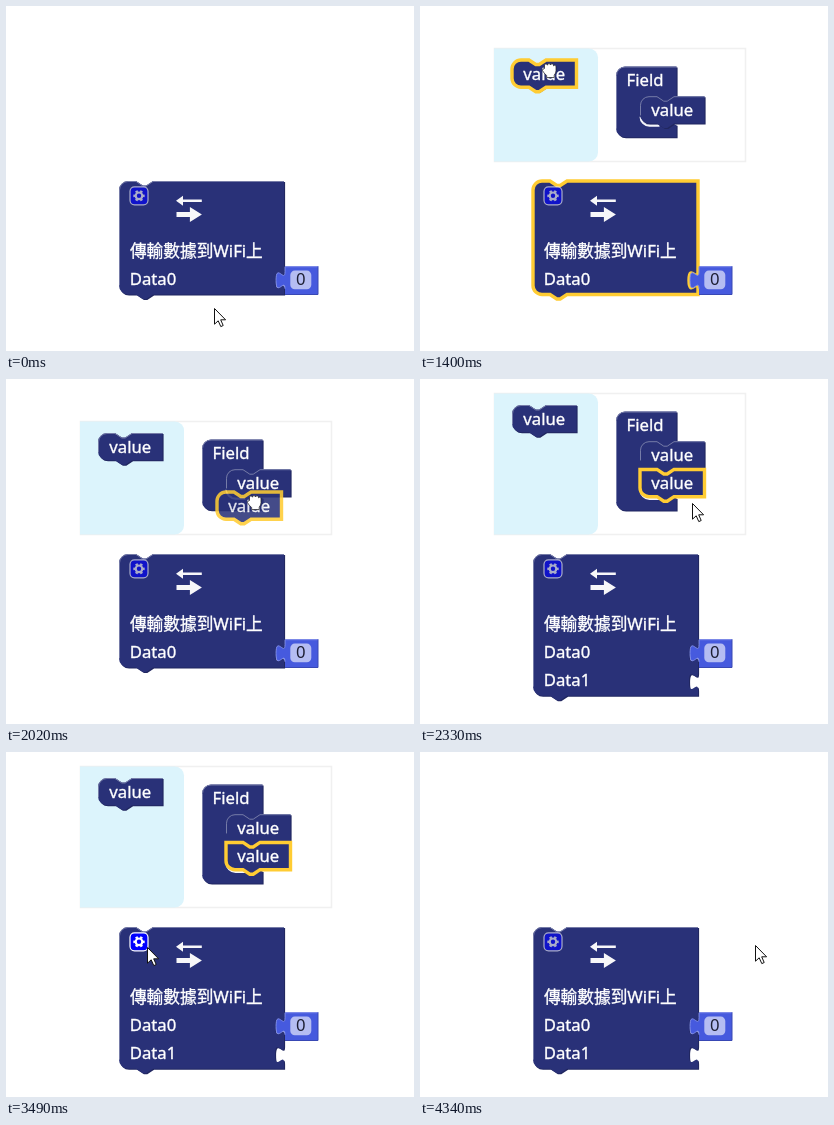
Animation of 408x345 px, one loop 4.42 s. Source, as an HTML page:

```html
<!DOCTYPE html>
<html lang="zh-Hant">
<head>
<meta charset="utf-8">
<title>Block mutator</title>
<style>
html, body { margin: 0; width: 100%; height: 100%; overflow: hidden; background: #fff; }
svg { display: block; width: 408px; height: 345px; }
text {
  font: 16.7px "Noto Sans", "Noto Sans CJK TC", "Noto Sans CJK JP", "Noto Sans CJK", sans-serif;
  fill: #fff; stroke: #fff; stroke-width: .35;
}
.body { fill: #293178; }
.shade { fill: #212760; transform: translate(1.1px, 1.1px); }
.shine { fill: none; stroke: #767ca8; stroke-width: 1; }
.ring { fill: none; stroke: #fc3; stroke-width: 3.4; display: none; }
.selected > .ring { display: inline; }
.selected > .shade, .selected > .shine { display: none; }
</style>
</head>
<body>
<svg viewBox="0 0 408 345">
  <g id="bubble">
    <rect id="frame" x="74.5" y="42.5" width="251" fill="#fff" stroke="#f0f0f0" stroke-width="1.6"/>
    <path id="palette" fill="#dcf4fc"/>
    <g id="store" transform="translate(92 54)"></g>
    <g transform="translate(196 60.5)">
      <path id="fieldShade" class="shade"/>
      <path id="field" class="body"/>
      <path id="fieldShine" class="shine"/>
      <path id="lip" fill="none" stroke="#f4f5fa" stroke-width="2"/>
      <text x="10.600" y="19.800">Field</text>
      <g id="first" transform="translate(24 29.700)"></g>
      <g id="second" class="selected" transform="translate(24 57.950)"></g>
    </g>
  </g>

  <g id="main" transform="translate(113 175)">
    <path id="mainShade" class="shade"/>
    <path id="mainBody" class="body"/>
    <path id="mainShine" class="shine"/>
    <path id="mainRing" class="ring"/>
    <g id="gear" transform="translate(20 14.800)">
      <rect x="-9" y="-9" width="18" height="18" rx="4.500" fill="#00f" stroke="#fff" stroke-width="1.200"/>
      <circle r="3.300" fill="none" stroke="#fff" stroke-width="2.200"/>
      <circle r="4.800" fill="none" stroke="#fff" stroke-width="1.800" pathLength="12" stroke-dasharray="1 1" stroke-dashoffset=".5"/>
    </g>
    <g fill="#f7f7f9">
      <path d="M57 19.800l7-5v3.800h18.800v2.400h-18.800v3.800z"/>
      <path d="M57.500 30.900h13.400v-5l12 7.500l-12 7.500v-5h-13.400z"/>
    </g>
    <text x="10.900" y="75.800">傳輸數據到WiFi上</text>
    <text x="10.800" y="103.800">Data0</text>
    <text x="10.800" y="132.400" id="data1">Data1</text>
  </g>

  <g transform="translate(279 260.200)">
    <path id="number" fill="#465ade"/>
    <path d="M33 0V28.300H0" fill="none" stroke="#3848b4"/>
    <path id="numberShine" fill="none" stroke="#7e8ce8"/>
    <rect x="5.300" y="4.400" width="21" height="18.600" rx="4.500" fill="#b5bdf2"/>
    <text x="15.800" y="19.200" text-anchor="middle" style="fill:#1d1f33;stroke:none">0</text>
  </g>

  <g id="drag" class="selected"></g>

  <path id="arrow" d="M.5 .5V16.200L4.200 12.800L6.800 18.600L9.200 17.500L6.700 11.800H11.600Z" fill="#fff" stroke="#111" stroke-width="1"/>
  <path id="hand" d="M-6.500 -.5q0 -2 2 -2v-2.500a1.500 1.500 0 0 1 3 -.8a1.500 1.500 0 0 1 3 -.2a1.500 1.500 0 0 1 3 .8a1.400 1.400 0 0 1 2.500 1v4q0 2.500 -1.800 4.200v2.500h-7.500v-2q-2.800 -2 -4.200 -5z" fill="#fff" stroke="#222" stroke-width=".7"/>
</svg>
<script>
const LOOP = 4420, ROW = 28.25;
const $ = id => document.getElementById(id);
const show = (id, on) => { $(id).style.display = on ? '' : 'none'; };
const setPath = (id, d) => $(id).setAttribute('d', d);
const place = (id, x, y) => $(id).setAttribute('transform', `translate(${x} ${y})`);

// Block outline pieces
const topLeft = 'M0 9a9 9 0 0 1 9 -9';
const notch = 'H17l6.8 4.5h3.4l6.8 -4.5';
const tail = 'H34l-6.8 4.5h-3.4l-6.8 -4.5';
const bottomLeft = 'H9a9 9 0 0 1 -9 -9Z';
const socket = 'v5.65c0 11.3 -9 -9 -9 8.5s9 -2.8 9 8.5';
const plug = 'c0 -11.3 -9 9 -9 -8.5s9 2.8 9 -8.5';

function outline(w, h, {inputs = '', squareTop, squareBottom} = {}) {
  return (squareTop ? 'M0 0' : topLeft) + `${notch}H${w}${inputs}V${h}${tail}` +
    (squareBottom ? 'H0Z' : bottomLeft);
}

function shine(w, h, squareTop) {
  const corner = squareTop ? 'V.5' : 'V9a8.5 8.5 0 0 1 8.5 -8.5';
  return `M.5 ${h - 9}${corner}${notch}H${w}`;
}

function valueBlock(id, corners = {}) {
  const d = outline(64.5, ROW - 1, corners);
  $(id).innerHTML = `<path class="shade" d="${d}"/><path class="body" d="${d}"/>` +
    `<path class="shine" d="${shine(64.5, ROW, corners.squareTop)}"/>` +
    `<path class="ring" d="${d}"/><text x="11.3" y="19.5">value</text>`;
}

function drawField(count) {
  const arm = 30 + ROW * count;
  const d = `${topLeft}H60.5V30H58l-6.8 4.5h-3.4l-6.8 -4.5H33a9 9 0 0 0 -9 9` +
    `V${arm - 9}a9 9 0 0 0 9 9H60.5v12.5${bottomLeft}`;
  setPath('field', d);
  setPath('fieldShade', d);
  setPath('fieldShine', `M.5 ${arm + 4}V9a8.5 8.5 0 0 1 8.5 -8.5H60.5`);
  setPath('lip', `M24.5 ${arm - 8}a9 9 0 0 0 9 9h10`);
}

function drawMain(rows) {
  const h = 85.25 + ROW * rows;
  const inputs = Array.from({length: rows}, (_, i) => `V${85.2 + ROW * i}${socket}`).join('');
  const d = outline(165, h, {inputs});
  for (const id of ['mainShade', 'mainBody', 'mainRing']) setPath(id, d);
  setPath('mainShine', shine(165, h));
}

function drawBubble(count) {
  const lift = 28 * (count - 1), h = 113 + lift;
  place('bubble', 0, -lift);
  $('frame').setAttribute('height', h);
  setPath('palette', `M74 42.5h95a9 9 0 0 1 9 9v${h - 18}a9 9 0 0 1 -9 9h-95z`);
  drawField(count);
  valueBlock('first', {squareBottom: count > 1});
}

// Pointer moves: first step, last step, steps, x, y
const start = [208, 302];
const moves = [
  [70, 530, 7, 136, 187],
  [940, 1400, 7, 129, 65],
  [1490, 1950, 7, 235.5, 124],
  [2020, 2020, 1, 248, 124],
  [2100, 2100, 1, 257, 124],
  [2250, 2640, 6, 315, 125],
  [2720, 2720, 1, 305, 135],
  [2800, 3240, 7, 133, 181],
  [3330, 3490, 3, 141, 195],
  [3640, 4110, 7, 319, 175],
  [4280, 4340, 2, 335, 193]
];
const ease = p => p * p * (3 - 2 * p);

function pointer(t) {
  let [x, y] = start;
  for (const [from, to, steps, tx, ty] of moves) {
    if (t < from) break;
    const gap = (to - from) / (steps - 1 || 1) || 1;
    const p = ease(Math.min(steps, Math.floor((t - from) / gap + 1e-6) + 1) / steps);
    x += (tx - x) * p;
    y += (ty - y) * p;
  }
  return [x, y];
}

const within = (t, a, b) => t >= a && t < b;
let rowsDrawn = 0;

function render(t) {
  const [x, y] = pointer(t);
  const rows = t < 2250 ? 1 : 2;
  if (rows !== rowsDrawn) {
    drawMain(rows);
    drawBubble(rows);
    show('data1', rows > 1);
    show('second', rows > 1);
    rowsDrawn = rows;
  }
  show('bubble', within(t, 770, 3717));
  $('main').classList.toggle('selected', within(t, 700, 1490) || within(t, 3640, 4110));

  const overGear = x > 124 && x < 143 && y > 181.5 && y < 200;
  $('gear').style.opacity = overGear ? 1 : .6;

  show('drag', within(t, 1400, 2250));
  place('drag', x - 37, y - 11);
  $('drag').style.opacity = t < 1490 ? 1 : .87;

  const grab = within(t, 1320, 2320);
  show('hand', grab);
  show('arrow', !grab);
  place(grab ? 'hand' : 'arrow', Math.round(x), Math.round(y));
}

valueBlock('store');
valueBlock('second', {squareTop: true});
valueBlock('drag');
setPath('number', `M0 0H33V28.3H0V22.6${plug}Z`);
setPath('numberShine', `M0 22.6${plug}V.5H32.5`);

const began = performance.now();
function tick() {
  render((performance.now() - began) % LOOP);
  requestAnimationFrame(tick);
}
render(0);
requestAnimationFrame(tick);
</script>
</body>
</html>
```
